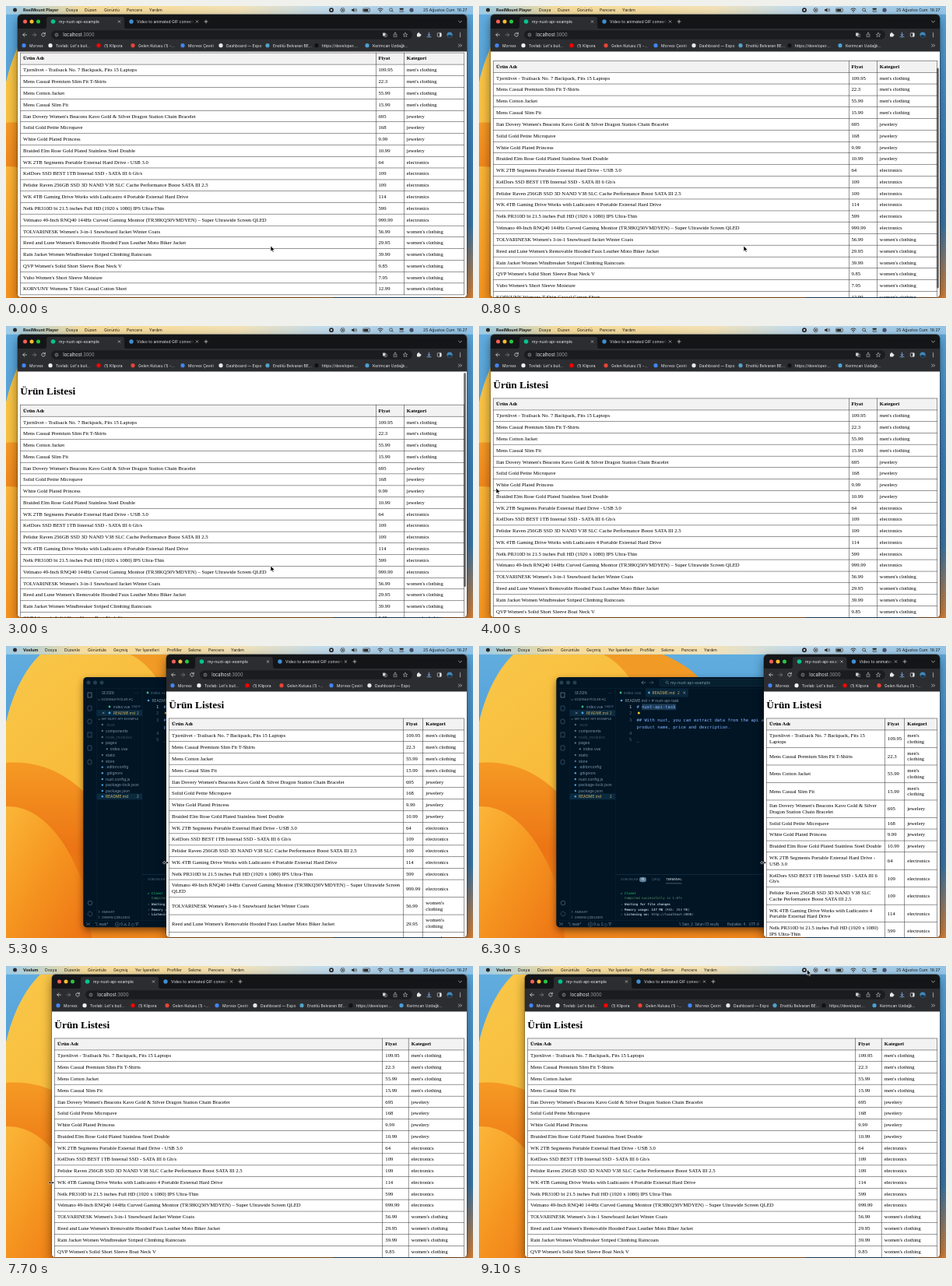
Animation of 600 by 375 pixels, one loop 9.2 s. Source, as an HTML page:

```html
<!DOCTYPE html>
<html lang="tr">
<head>
<meta charset="utf-8">
<title>Ürün Listesi</title>
<style>
  html, body { margin: 0; width: 100%; height: 100%; overflow: hidden; background: #f0922e; }
  #stage { position: absolute; left: 0; top: 0; width: 600px; height: 375px; overflow: hidden; }
  svg { font-family: Inter, "Open Sans", sans-serif; }
  #stage > svg { position: absolute; left: 0; top: 0; }
  .mono { font-family: "DejaVu Sans Mono", "Liberation Mono", monospace; white-space: pre; }
  .shade { filter: drop-shadow(0 4px 5px #0007); }
  #win {
    position: absolute; top: 11px; right: 8px; bottom: 1.3px; border-radius: 4.5px;
    background: #fff; box-shadow: 0 0 0 .4px #0009, 0 5px 14px #0007;
  }
  #page {
    position: absolute; top: 58.5px; right: 8px; bottom: 1.3px; overflow: hidden;
    background: #fff; border-radius: 0 0 4.5px 4.5px;
  }
  #doc {
    position: absolute; left: 0; top: 0; box-sizing: border-box; padding: 22px 8px 8px;
    transform-origin: 0 0; color: #000;
    font: 16px/18.5px "Liberation Serif", "Times New Roman", serif;
  }
  h1 { margin: 0 0 22.3px; font-size: 32px; line-height: 37px; }
  table { width: 100%; border-collapse: collapse; }
  th, td { border: 1px solid #000; padding: 8px; text-align: left; }
  th { background: #f2f2f2; }
  #thumb {
    position: absolute; right: 1px; top: 1.5px; width: 2.6px; border-radius: 2px; background: #0008;
  }
</style>
</head>
<body>
<div id="stage">
  <svg id="desk" width="600" height="375"></svg>
  <div id="win"></div>
  <div id="page">
    <div id="doc"><h1>Ürün Listesi</h1><table id="list"></table></div>
    <div id="thumb"></div>
  </div>
  <svg id="bar" width="600" height="375"></svg>
</div>
<script>
const $ = id => document.getElementById(id);
const LOOP = 9200, STEP = 100, SCALE = 5 / 12, RIGHT = 592, MAX_SCROLL = 32.9;

const text = (x, y, s, size = 5, fill = '#dfe1e5', more = '') =>
  `<text x="${x}" y="${y + size * .36}" font-size="${size}" fill="${fill}" ${more}>${s}</text>`;
const dot = (x, y, r, fill) => `<circle cx="${x}" cy="${y}" r="${r}" fill="${fill}"/>`;
const box = (x, y, w, h, fill, more = '') =>
  `<rect x="${x}" y="${y}" width="${w}" height="${h}" fill="${fill}" ${more}/>`;
const line = (d, color = '#dadce0', w = .7) =>
  `<path d="${d}" fill="none" stroke="${color}" stroke-width="${w}" stroke-linecap="round" stroke-linejoin="round"/>`;
const shape = (d, fill) => `<path d="${d}" fill="${fill}"/>`;
const lights = (x, y, colors) => colors.map((c, i) => dot(x + i * 8.5, y, 2.5, c)).join('');

// ---- product table
const M = "men's clothing", J = 'jewelery', E = 'electronics', W = "women's clothing";
const products = [
  ['Tjornlivet - Trailsack No. 7 Backpack, Fits 15 Laptops', 109.95, M],
  ['Mens Casual Premium Slim Fit T-Shirts', 22.3, M],
  ['Mens Cotton Jacket', 55.99, M],
  ['Mens Casual Slim Fit', 15.99, M],
  ["Ilan Dovery Women's Beacons Kavo Gold &amp; Silver Dragon Station Chain Bracelet", 695, J],
  ['Solid Gold Petite Micropave', 168, J],
  ['White Gold Plated Princess', 9.99, J],
  ['Braided Elm Rose Gold Plated Stainless Steel Double', 10.99, J],
  ['WK 2TB Segments Portable External Hard Drive - USB 3.0', 64, E],
  ['KelDors SSD BEST 1TB Internal SSD - SATA III 6 Gb/s', 109, E],
  ['Pelidor Raven 256GB SSD 3D NAND V38 SLC Cache Performance Boost SATA III 2.5', 109, E],
  ['WK 4TB Gaming Drive Works with Ludicastro 4 Portable External Hard Drive', 114, E],
  ['Nelk PR310D bi 21.5 inches Full HD (1920 x 1080) IPS Ultra-Thin', 599, E],
  ['Velmano 49-Inch RNQ40 144Hz Curved Gaming Monitor (TR38KQ50VMDYEN) – Super Ultrawide Screen QLED', 999.99, E],
  ["TOLVARINESK Women's 3-in-1 Snowboard Jacket Winter Coats", 56.99, W],
  ["Reed and Lune Women's Removable Hooded Faux Leather Moto Biker Jacket", 29.95, W],
  ['Rain Jacket Women Windbreaker Striped Climbing Raincoats', 39.99, W],
  ["QVP Women's Solid Short Sleeve Boat Neck V", 9.85, W],
  ["Vubo Women's Short Sleeve Moisture", 7.95, W],
  ['KORVUNY Womens T Shirt Casual Cotton Short', 12.99, W]
];
const row = (cells, tag) => `<tr>${cells.map(c => `<${tag}>${c}</${tag}>`).join('')}</tr>`;
$('list').innerHTML = row(['Ürün Adı', 'Fiyat', 'Kategori'], 'th') +
  products.map(p => row(p, 'td')).join('');

// ---- wallpaper and menu bar
const grad = (id, dir, ...stops) => `<linearGradient id="${id}" ${dir}>${stops.map((c, i) =>
  `<stop offset="${i / (stops.length - 1)}" stop-color="${c}"/>`).join('')}</linearGradient>`;
const across = 'x1="0" y1="0" x2="1" y2="0"', down = 'x1="0" y1="0" x2="0" y2="1"';
const slant = 'x1="0" y1="0" x2="1" y2="1"';

const wallpaper = `<defs>
  ${grad('sky', down, '#62aee0', '#4a97d2', '#3579b4')}
  ${grad('petal', slant, '#f9c84a', '#f8b432', '#f08a1c')}
  ${grad('fold', down, '#f59a24', '#ec7414', '#f0861c')}
  ${grad('amber', slant, '#fbb638', '#f5931f', '#ec7214')}
  ${grad('edge', down, '#5fa9dc', '#4a92cb', '#3c7fb8', '#3c78a8', '#d98238')}
  ${grad('menuTint', across, '#9dcbe8', '#f6dc9c', '#f6dda0', '#f3e2b8', '#c5dcea', '#a9cfe8', '#93c3e6')}</defs>
  ${box(0, 0, 600, 375, 'url(#sky)')}
  ${shape('M0 98C8 62 24 30 44 11H236C262 22 280 40 300 70L420 375H0Z', 'url(#petal)')}
  ${shape('M0 150C50 146 90 170 120 210L400 330V375H0Z', 'url(#fold)')}
  ${shape('M0 206C44 204 82 250 104 320L110 375H0Z', 'url(#amber)')}
  ${shape('M160 11H236C262 22 280 34 290 52H200C190 34 178 20 160 11Z', '#f19a26')}
  ${box(560, 0, 40, 375, 'url(#edge)')}`;

const menu = (id, items) => `<g id="${id}">${items.map(([x, s], i) =>
  text(x, 5.2, s, i ? 5.2 : 5.3, '#1c1a18', i ? '' : 'font-weight="700"')).join('')}</g>`;
const ink = '#2a2724';
const menuBar = box(0, 0, 600, 10.8, 'url(#menuTint)') +
  box(9, 2.6, 5, 5, ink, 'rx="2.5"') +
  menu('playerMenu', [[22, 'ReelMount Player'], [77, 'Dosya'], [101, 'Düzen'], [126, 'Görüntü'],
    [155, 'Pencere'], [184, 'Yardım']]) +
  menu('browserMenu', [[22, 'Vexlum'], [50, 'Dosya'], [75, 'Düzenle'], [105, 'Görüntüle'],
    [138, 'Geçmiş'], [166, 'Yer İşaretleri'], [207, 'Profiller'], [234, 'Sekme'],
    [260, 'Pencere'], [289, 'Yardım']]) +
  dot(418, 5.2, 2.9, ink) + box(416.9, 4.1, 2.2, 2.2, '#c5dcea') +
  `<circle cx="432.5" cy="5.2" r="2.6" fill="none" stroke="${ink}" stroke-width=".7"/>` +
  shape('M431.7 3.7L434.3 5.2L431.7 6.7Z', ink) +
  shape('M444 4.2H445.4L447.4 2.5V7.9L445.4 6.2H444Z', ink) +
  line('M448.6 4Q449.6 5.2 448.6 6.4M449.9 3Q451.5 5.2 449.9 7.4', ink, .6) +
  box(458.5, 3, 9, 4.6, 'none', `rx="1.2" stroke="${ink}" stroke-width=".6"`) +
  box(459.4, 3.9, 6, 2.8, ink, 'rx=".5"') +
  line('M477.8 4Q481 1.4 484.2 4M479.2 5.6Q481 4.2 482.8 5.6', ink, .9) + dot(481, 7.2, .8, ink) +
  `<circle cx="494.6" cy="4.8" r="1.9" fill="none" stroke="${ink}" stroke-width=".7"/>` +
  line('M496 6.2L497.4 7.6', ink) +
  box(505.5, 2.8, 5.4, 2, ink, 'rx="1"') +
  box(505.7, 5.8, 5, 1.7, 'none', `rx=".8" stroke="${ink}" stroke-width=".5"`) +
  dot(521, 5.2, 2.6, '#4b5570') +
  text(592.5, 5.2, '25 Ağustos Cum&#160; 16:27', 5.2, '#1c1a18', 'text-anchor="end"');

// ---- code editor
const dim = '#4f6c82', soft = '#8299ab', pale = '#b4c5d2', gold = '#d3b55c';
const tree = [
  [128, 101, '.nuxt', '#3c5363'], [128, 109, 'components'], [128, 117, 'node_modules', '#3c5363'],
  [128, 124.5, 'pages'], [134, 132.3, 'index.vue'], [128, 140, 'static'], [128, 148, 'store'],
  [128, 155.6, '.editorconfig'], [128, 163.3, '.gitignore'], [128, 171, 'nuxt.config.js'],
  [128, 178.5, 'package-lock.json'], [128, 186, 'package.json'], [128, 193.3, 'README.md', gold]
];
const code = (x, y, s, fill = '#a9bfd6', size = 5.55) => text(x, y, s, size, fill, 'class="mono"');
const term = (y, s, fill = pale) => code(182, y, s, fill, 4.1);
const bold = s => `<tspan font-weight="700">${s}</tspan>`;
const editor = `<g>
  <rect class="shade" x="99.3" y="40" width="420" height="321.3" rx="4.5" fill="#011525"/>
  ${lights(106, 47, ['#24404f', '#24404f', '#24404f'])}
  ${line('M214 47H209M211 45L209 47L211 49', soft, .6)}${line('M219 47H224M222 45L224 47L222 49', dim, .6)}
  ${box(232, 42.5, 150, 9, '#06202f', 'rx="2" stroke="#1d3a4d" stroke-width=".4"')}
  <circle cx="241.5" cy="46.6" r="1.5" fill="none" stroke="${soft}" stroke-width=".5"/>
  ${line('M242.6 47.8L243.8 49', soft, .5)}${text(246, 47, 'my-nuxt-api-example', 5, soft)}
  ${box(99.3, 54, 420, .4, '#0e2636')}${box(116, 54, .4, 298, '#0e2636')}${box(175, 54, .4, 298, '#0e2636')}
  ${[63, 80, 97, 114, 131, 149].map((y, i) =>
    box(105, y - 3, 5, 6, 'none', `rx="${i % 3}" stroke="${i ? dim : soft}" stroke-width=".6"`)).join('')}
  <circle cx="108" cy="330" r="2.8" fill="none" stroke="${dim}" stroke-width=".7"/>
  <circle cx="108" cy="344" r="2.8" fill="none" stroke="${dim}" stroke-width="1" stroke-dasharray="1.3 .8"/>
  ${text(123, 60, 'GEZGİN', 4.2, soft)}${text(166, 59, '...', 5, soft)}
  ${line('M118.5 68.5L119.8 69.8L121.1 68.5', soft, .5)}${text(123, 69, 'DÜZENLEYİCİLER AÇ', 4, soft)}
  ${dot(133, 78, 1.4, '#3fb883')}${text(138, 78, 'index.vue', 4.7, soft)}${text(161.5, 78, 'pages', 3.9, dim)}
  ${box(116.4, 82, 58.6, 8, '#0b2a40')}${line('M124.2 85L126.2 87M126.2 85L124.2 87', pale, .5)}
  ${dot(133, 86, 1.4, '#4aa3df')}${text(138, 86, 'README.md', 4.7, gold)}${text(168, 86, '2', 4.3, gold)}
  ${line('M118.5 93.5L119.8 94.8L121.1 93.5', soft, .5)}${text(123, 94, 'MY-NUXT-API-EXAMPLE', 4, soft)}
  ${box(116.4, 189.4, 58.6, 7.8, '#0b2a40')}
  ${tree.map(([x, y, s, c], i) => dot(x - 4.2, y, 1.2, i > 6 ? '#4aa3df' : dim) + text(x, y, s, 4.9, c || soft)).join('')}
  ${text(168, 193.3, '2', 4.3, gold)}
  ${line('M119 340L120.3 341.3L119 342.6M119 346.9L120.3 348.2L119 349.5', soft, .5)}
  ${text(123, 341.3, 'ANAHAT', 4, soft)}${text(123, 348.2, 'ZAMAN ÇİZELGESİ', 4, soft)}
  ${box(214, 54.4, 55, 11, '#0a263b')}
  ${dot(182, 60, 1.4, '#3fb883')}${text(186, 60, 'index.vue', 4.9, dim)}
  ${dot(218.5, 60, 1.4, '#4aa3df')}${text(222.5, 60, 'README.md', 4.9, gold)}${text(255, 60, '2', 4.5, gold)}
  ${line('M262.5 58.8L265 61.2M265 58.8L262.5 61.2', pale, .5)}
  ${dot(183, 70, 1.3, '#4aa3df')}${text(187.5, 70, 'README.md &gt; # nuxt-api-task', 4.8, soft)}
  ${box(209.3, 74.3, 43.8, 7.8, '#1d3b53')}
  ${[78, 86.5, 95, 112, 120].map((y, i) => code(193, y, i + 1, i ? '#4b6479' : pale)).join('')}
  ${code(202.5, 78, '# nuxt-api-task', '#82b1ff')}
  ${dot(205.3, 86, 1.5, '#ffcc33')}
  ${code(202.5, 95, '## With nuxt, you can extract data from the api and', '#82b1ff')}
  ${code(202.5, 103.7, 'product name, price and description.', '#82b1ff')}
  ${code(202.5, 120, '_', soft)}
  ${box(175, 293.5, 344, .5, '#1d3a4d')}
  ${text(182, 300, 'SORUNLAR', 4.1, dim)}${box(206, 296.8, 9, 6.4, '#5f7e97', 'rx="3.2"')}
  ${text(210.5, 300, '12', 4, '#fff', 'text-anchor="middle"')}
  ${text(222, 300, 'ÇIKIŞ', 4.1, dim)}${text(240, 300, 'TERMİNAL', 4.1, '#dfe8ee')}
  ${box(240, 304.6, 20.5, .6, '#6f8799')}
  ${term(317.7, '✔ Client', '#22da6e')}${term(323.3, '  Compiled successfully in 1.07s', '#5f9a66')}
  ${term(332, '› ' + bold('Waiting for file changes'))}
  ${term(338.2, `› ${bold('Memory usage:')} ${bold('147 MB')} (RSS: 253 MB)`)}
  ${term(344.6, `› ${bold('Listening on:')} http://localhost:3000/`)}
  ${box(99.3, 352, 420, .4, '#0e2636')}
  ${line('M103.5 355.5L105.5 357L103.5 358.5M107.5 355.5L106 357L107.5 358.5', soft, .5)}
  ${text(114, 357, '⌥ main*', 4.3, soft)}${text(140, 357, '⊗ 0 △ 2 ⓘ 17', 4.3, soft)}
  ${text(257, 357, '1. Satır, 2. Sütun (13 seçili)', 4.2, soft)}${text(319, 357, 'Boşluklar: 4', 4.2, soft)}
  ${text(347, 357, 'UTF-8', 4.2, soft)}</g>`;

$('desk').innerHTML = wallpaper + editor + menuBar;

// ---- browser toolbar
const STRIP = '#141517', TOOLS = '#2c2d30', FIELD = '#1b1c1e';
const marks = [
  [8, '#4285f4', 'Morvex', 32], [42, '#f4f4f4', "Tovlab: Let's buil...", 93],
  [104, '#ff0000', '(1) Klipora', 139], [148, '#ea4335', 'Gelen Kutusu (1) -...', 202],
  [212, '#4285f4', 'Morvex Çeviri', 251], [261, '#e8eaed', 'Dashboard — Expo', 312],
  [321, '#4fa3c7', 'Enstitü Belvaran BE...', 375], [384, '#111', 'https://developer....', 439],
  [449, '#4aa0d8', 'Kerimcan Uzdağlı...', 505]
];
const cross = line('M-1.3 -1.3L1.3 1.3M1.3 -1.3L-1.3 1.3', '#dadce0', .6);
const grey = '#c9ccd1';
const arrow = 'M0 0V7.2L1.7 5.7L2.9 8.3L4 7.8L2.9 5.3H5.2Z';

$('bar').innerHTML = `
  <defs>${grad('fade', across, STRIP + '00', STRIP)}${grad('fadeOn', across, TOOLS + '00', TOOLS)}</defs>
  <path id="strip" fill="${STRIP}"/>
  <rect id="tools" y="29" height="29.5" fill="${TOOLS}"/>
  <g id="left">
    ${lights(9.5, 20, ['#ff5f57', '#febc2e', '#28c840'])}
    <path id="tab" fill="${TOOLS}"/>
    ${dot(45.5, 20, 2.8, '#00c58e')}
    <svg class="label" x="53" y="14" height="12">${text(0, 6, 'my-nuxt-api-example', 5.1, '#e8eaed')}</svg>
    <rect class="veil" y="15" width="8" height="10" fill="url(#fadeOn)"/>
    <g class="close">${cross}</g>
    <g id="tab2">
      ${dot(9, 20, 2.7, '#3d8fd6')}
      <svg class="label" x="16" y="14" height="12">${text(0, 6, 'Video to animated GIF converter', 5.1, '#dfe1e5')}</svg>
      <rect class="veil" y="15" width="8" height="10" fill="url(#fade)"/>
      <g class="close">${cross}</g>
    </g>
    <g id="plus">${line('M-2 20H2M0 18V22')}</g>
    ${line('M11.5 37H6.8M8.9 34.8L6.7 37L8.9 39.2', '#e8eaed')}
    ${line('M19 37H23.6M21.5 34.8L23.7 37L21.5 39.2', '#85888c')}
    ${line('M35 35.5A2.3 2.3 0 1 0 35.3 37.6M35.3 34.2V35.9H33.6', '#e8eaed')}
    <rect id="pill" x="43" y="31.3" height="11.4" rx="5.7" fill="${FIELD}"/>
    <circle cx="50" cy="37" r="2" fill="none" stroke="${grey}" stroke-width=".5"/>${line('M50 36.9V38M50 35.9V36', grey, .5)}
    ${text(58.3, 37, 'localhost<tspan fill="#9aa0a6">:3000</tspan>', 5.7, '#e8eaed')}
    ${marks.map(([x, c, s]) => `<g class="mark">${dot(x, 50.7, 2.6, c)}${text(x + 7, 50.7, s, 5, '#e8eaed')}</g>`).join('')}
  </g>
  ${line('M581.5 19.2L583.5 21.2L585.5 19.2')}
  ${box(484, 34.5, 3.6, 4, grey, 'rx=".5"')}${box(486, 36, 3.4, 3.6, 'none', `rx=".5" stroke="${grey}" stroke-width=".5"`)}
  ${line('M499 36.3H498V39.6H502V36.3H501M500 38V34M498.9 35L500 33.9L501.1 35', grey, .5)}
  ${line('M513 34.2L513.8 36.2L515.9 36.3L514.3 37.6L514.9 39.6L513 38.5L511.1 39.6L511.7 37.6L510.1 36.3L512.2 36.2Z', grey, .5)}
  ${box(528, 35.2, 4.4, 4.2, '#e8eaed', 'rx=".7"')}${dot(530.2, 35, 1, '#e8eaed')}${dot(532.5, 37.3, 1, '#e8eaed')}
  ${line('M543.5 34V38M541.8 36.6L543.5 38.3L545.2 36.6M541 39.7H546', '#8ab4f8', .8)}
  ${box(554.3, 34.7, 5, 4.6, 'none', 'rx=".6" stroke="#e8eaed" stroke-width=".6"')}${box(557.2, 34.7, 2, 4.6, '#e8eaed')}
  ${dot(570, 37, 3.6, '#3f87bd')}${shape('M566.8 38.6Q570 35.5 573.2 38.6A3.6 3.6 0 0 1 566.8 38.6Z', '#1d3348')}
  ${[34.8, 37, 39.2].map(y => dot(583.5, y, .65, '#e8eaed')).join('')}
  ${line('M581.5 49.1L583 50.7L581.5 52.3M584 49.1L585.5 50.7L584 52.3')}
  <g id="arrow"><path d="${arrow}" fill="#000" stroke="#fff" stroke-width=".6" stroke-linejoin="round"/></g>
  <g id="resize">${line('M-2.6 0H2.6', '#fff', 1.7)}${shape('M-4 0L-1.3 -2.2V2.2ZM4 0L1.3 -2.2V2.2Z', '#fff')}
    ${line('M-2.4 0H2.4', '#000', .8)}${shape('M-3.4 0L-1.6 -1.5V1.5ZM3.4 0L1.6 -1.5V1.5Z', '#000')}</g>`;

// ---- motion
function track(t, keys) {
  for (let i = 1; i < keys.length; i++) {
    const [t0, a] = keys[i - 1], [t1, b] = keys[i];
    if (t < t1) {
      const k = Math.max(0, (t - t0) / (t1 - t0));
      return a + (b - a) * k * k * (3 - 2 * k);
    }
  }
  return keys[keys.length - 1][1];
}
const edgeKeys = [[4400, 15], [6100, 366], [6400, 366], [7600, 59]];
const scrollKeys = [[500, MAX_SCROLL], [1300, 0], [2600, 0], [3000, -8.2], [3500, 0]];
const thumbKeys = [[300, 0], [500, 1], [1500, 1], [1900, 0], [2500, 0], [2700, 1], [3400, 1], [3800, 0]];
const xKeys = [[3300, 340], [4000, 22], [4300, 14]];
const yKeys = [[3300, 308], [4000, 208], [4300, 278.3], [7800, 278.3], [8900, 4.5]];

const set = (el, attrs) => Object.entries(attrs).forEach(([k, v]) => el.setAttribute(k, v));
const show = (el, on) => { el.style.display = on ? '' : 'none'; };
const labels = document.querySelectorAll('.label'), veils = document.querySelectorAll('.veil');
const closes = document.querySelectorAll('.close'), markEls = document.querySelectorAll('.mark');

function layout(x) {
  const w = RIGHT - x, tab = Math.min(100, (w - 87) / 2), end = 37 + tab;
  $('win').style.left = $('page').style.left = x + 'px';
  $('doc').style.width = w / SCALE + 'px';
  set($('strip'), { d: `M${x} 29V15.5Q${x} 11 ${x + 4.5} 11H587.5Q592 11 592 15.5V29Z` });
  set($('tools'), { x, width: w });
  set($('left'), { transform: `translate(${x})` });
  set($('tab'), { d: `M34 29Q37 29 37 26V17Q37 14 40 14H${end - 3}Q${end} 14 ${end} 17V26Q${end} 29 ${end + 3} 29Z` });
  set($('tab2'), { transform: `translate(${end})` });
  set($('plus'), { transform: `translate(${42 + 2 * tab})` });
  set($('pill'), { width: 522 - x - 43 });
  [37, 0].forEach((base, i) => {
    set(labels[i], { width: tab - 26 });
    set(veils[i], { x: base + tab - 18 });
    set(closes[i], { transform: `translate(${base + tab - 6.5} 20)` });
  });
  marks.forEach((m, i) => show(markEls[i], x + m[3] < 577));
}

let edge = null;
function draw(t) {
  const x = track(t, edgeKeys), scroll = track(t, scrollKeys);
  if (x !== edge) layout(edge = x);
  $('doc').style.transform = `translateY(${-scroll}px) scale(${SCALE})`;
  const thumb = $('thumb').style;
  thumb.opacity = track(t, thumbKeys);
  thumb.height = 283 + Math.min(0, scroll) + 'px';
  thumb.transform = `translateY(${Math.max(0, scroll) * .87}px)`;

  show($('playerMenu'), t < 4300);
  show($('browserMenu'), t >= 4300);
  const dragging = t >= 4300 && t <= 7800;
  show($('resize'), dragging);
  show($('arrow'), !dragging);
  const px = t < 4300 ? track(t, xKeys) : dragging ? x - .8 : track(t, [[7800, 58], [8900, 421.5]]);
  set($(dragging ? 'resize' : 'arrow'), { transform: `translate(${px} ${track(t, yKeys)})` });
}

const start = performance.now();
function tick() {
  const t = Math.max(0, performance.now() - start) % LOOP;
  draw(Math.floor(t / STEP) * STEP);
  requestAnimationFrame(tick);
}
draw(0);
requestAnimationFrame(tick);
</script>
</body>
</html>
```
